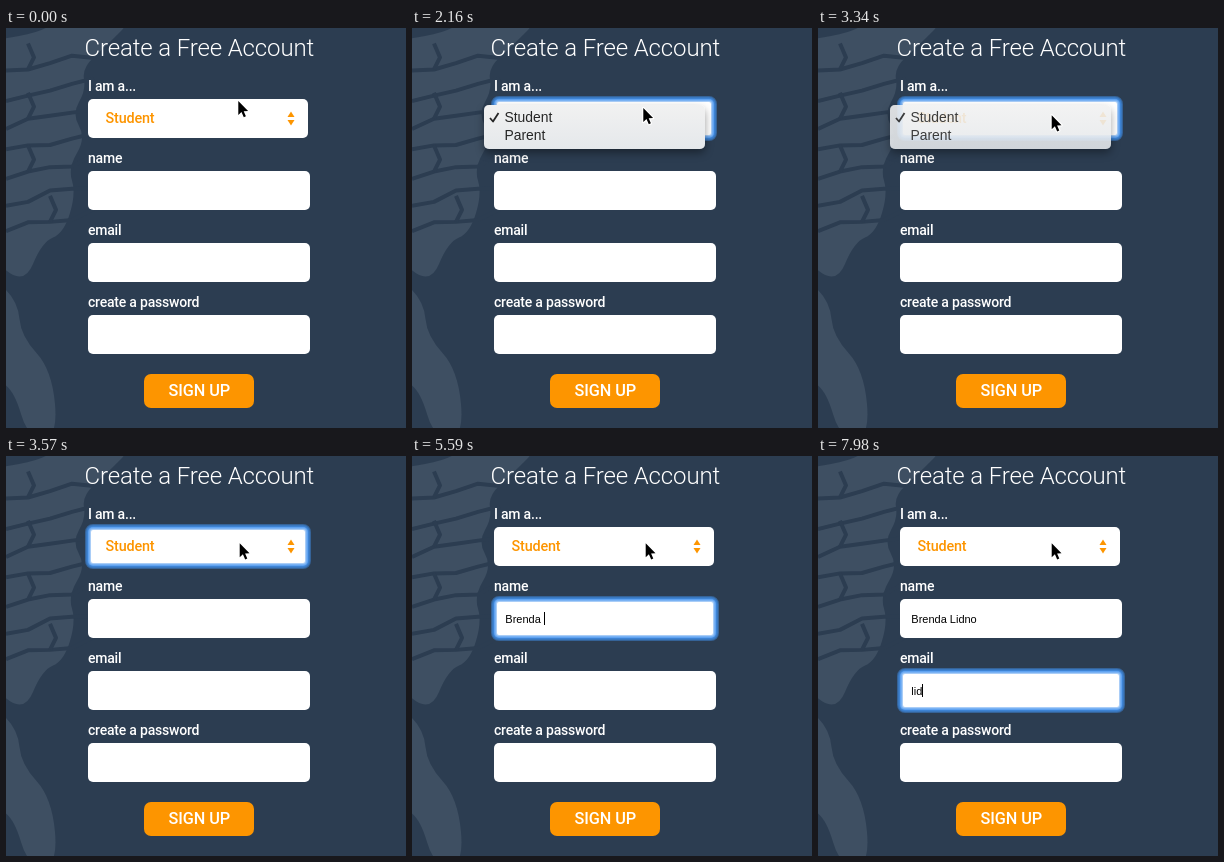
An HTML page with a canvas for the animation above (8000 ms loop, 400 by 400 pixels).

```html
<!DOCTYPE html>
<html lang="en">
<head>
<meta charset="utf-8">
<title>Sign-up form</title>
<style>
  html, body { margin: 0; width: 100%; height: 100%; overflow: hidden; background: #2c3d51; }
  canvas { display: block; width: 400px; height: 400px; }
</style>
</head>
<body>
<canvas id="stage"></canvas>
<script>
const LOOP = 8000;
const TICK = 115;
const NAVY = '#2c3d51', LAND = '#3e4f62', ORANGE = '#fd9500';
const BODY_FONT = 'Roboto, sans-serif';
const INPUT_FONT = '11px "Liberation Sans", Arial, sans-serif';
const MENU_FONT = '13.9px "Liberation Sans", Arial, sans-serif';

// Bursts of keystrokes, one key per tick
const NAME_KEYS = [['Bre', 4640], ['nda', 5120], [' ', 5590], ['Lid', 5950], ['no', 6660]];
const EMAIL_KEYS = [['li', 7380], ['d', 7980]];

const canvas = document.getElementById('stage');
const ctx = canvas.getContext('2d');
const ratio = window.devicePixelRatio || 1;
canvas.width = canvas.height = 400 * ratio;
ctx.scale(ratio, ratio);

const within = (t, from, to) => t >= from && t < to;

// Number of ticks begun since start, limited to count
function ticks(t, start, count) {
  return Math.max(0, Math.min(count, Math.floor((t - start) / TICK) + 1));
}

function typed(keys, t) {
  return keys.map(([str, start]) => str.slice(0, ticks(t, start, str.length))).join('');
}

function focusAt(t) {
  if (t >= 6900) return 'email';
  if (t >= 4040) return 'name';
  return t >= 2160 ? 'select' : '';
}

function menuAlpha(t) {
  return t < 2160 ? 0 : 1 - (ticks(t, 3340, 3) / 3) ** 2;
}

function seededRandom(seed) {
  return () => (seed = seed * 16807 % 2147483647) / 2147483647;
}

function trace(points, close = true) {
  ctx.beginPath();
  points.forEach(([x, y]) => ctx.lineTo(x, y));
  if (close) ctx.closePath();
}

function polygon(points, color) {
  trace(points);
  ctx.fillStyle = color;
  ctx.fill();
}

// Closed curve through the midpoints of the given corners
function blob(points, color) {
  ctx.beginPath();
  points.forEach(([x, y], i) => {
    const [nextX, nextY] = points[(i + 1) % points.length];
    ctx.quadraticCurveTo(x, y, (x + nextX) / 2, (y + nextY) / 2);
  });
  ctx.closePath();
  ctx.fillStyle = color;
  ctx.fill();
}

function roundBox(x, y, w, h, r) {
  ctx.beginPath();
  ctx.roundRect(x, y, w, h, r);
}

function text(str, x, y, font, color, align = 'left', spacing = 0) {
  ctx.font = font;
  ctx.letterSpacing = spacing + 'px';
  ctx.fillStyle = color;
  ctx.textAlign = align;
  ctx.fillText(str, x, y);
}

function drawMap() {
  blob([
    [-20, 14], [46, 2], [50, -20], [130, -12], [100, 18], [76, 40], [80, 62],
    [66, 86], [80, 110], [62, 140], [70, 165], [58, 205], [36, 214],
    [18, 258], [-20, 225]
  ], LAND);
  blob([
    [-12, 250], [12, 274], [15, 308], [46, 342], [52, 410], [22, 410], [8, 362], [-12, 350]
  ], LAND);

  const random = seededRandom(11);
  ctx.strokeStyle = NAVY;
  ctx.lineWidth = 4;
  ctx.lineJoin = 'round';
  for (let row = 0; row < 7; row++) {
    const river = [];
    for (let x = 0; x <= 88; x += 22) {
      river.push([x, 47 + row * 26 - x * 0.23 + (random() - 0.5) * 9]);
    }
    trace(river, false);
    ctx.stroke();
    if (row % 2) continue;
    const [x, y] = river[1 + Math.floor(random() * 2)];
    trace([[x, y], [x + 6, y - 12], [x, y - 26]], false);
    ctx.stroke();
  }
}

function drawField(y, focused, w = 222) {
  roundBox(82, y, w, 39, 5);
  ctx.fillStyle = '#fff';
  ctx.fill();
  if (!focused) return;
  ctx.strokeStyle = 'rgba(66,145,238,.45)';
  for (let width = 6; width > 0; width -= 2) {
    ctx.lineWidth = width;
    ctx.stroke();
  }
}

function drawEntry(str, fieldY, caret) {
  const x = 93.3;
  text(str, x, fieldY + 24, INPUT_FONT, '#000');
  if (caret) ctx.fillRect(Math.round(x + ctx.measureText(str).width), fieldY + 13, 1, 13);
}

function drawSelect(focused) {
  drawField(71, focused, 220);
  text('Student', 99.6, 95, `500 14.4px ${BODY_FONT}`, ORANGE, 'left', -0.2);
  for (const side of [-1, 1]) {
    const base = 90.5 + side * 1.5;
    polygon([[281.5, base], [285, base + side * 5.5], [288.5, base]], ORANGE);
  }
}

function drawMenuShadow() {
  ctx.save();
  ctx.beginPath();
  ctx.rect(0, 0, 400, 400);
  ctx.roundRect(72, 77, 221, 44, 5);
  ctx.clip('evenodd');
  ctx.shadowColor = 'rgba(0,0,0,.4)';
  ctx.shadowBlur = 9 * ratio;
  ctx.shadowOffsetY = 4 * ratio;
  roundBox(72, 77, 221, 44, 5);
  ctx.fill();
  ctx.restore();
}

function verticalGradient(top, bottom, from, to) {
  const gradient = ctx.createLinearGradient(0, top, 0, bottom);
  gradient.addColorStop(0, from);
  gradient.addColorStop(1, to);
  return gradient;
}

function drawMenu(alpha, highlighted) {
  ctx.save();
  ctx.globalAlpha = alpha;
  drawMenuShadow();
  roundBox(72, 77, 221, 44, 5);
  ctx.fillStyle = verticalGradient(77, 121, '#f1f1f1', '#e5e8eb');
  ctx.fill();

  if (highlighted) {
    ctx.fillStyle = verticalGradient(81, 99, '#5a92f5', '#2368ef');
    ctx.fillRect(72, 81, 221, 18);
  }
  const ink = '#262626';
  const firstInk = highlighted ? '#fff' : ink;
  text('Student', 92.5, 94, MENU_FONT, firstInk);
  text('Parent', 92.5, 112, MENU_FONT, ink);
  trace([[78, 90], [81, 93.5], [86.5, 85]], false);
  ctx.strokeStyle = firstInk;
  ctx.lineWidth = 1.8;
  ctx.stroke();
  ctx.restore();
}

function drawPointer(t) {
  const x = 232.3 - ticks(t, 120, 1) + ticks(t, 2750, 3) * 0.8;
  const y = 73 + ticks(t, 1560, 2) * 3.5 + ticks(t, 2750, 3) * 2.4;
  ctx.save();
  ctx.translate(x, y);
  trace([[0, 0], [0, 14], [3.2, 11], [5.5, 16.2], [7.6, 15.3], [5.4, 10.2], [9.8, 10]]);
  ctx.lineJoin = 'round';
  ctx.strokeStyle = '#fff';
  ctx.lineWidth = 2.4;
  ctx.stroke();
  ctx.fillStyle = '#000';
  ctx.fill();
  ctx.restore();
}

function draw(t) {
  const focus = focusAt(t);
  const menu = menuAlpha(t);
  const caret = !within(t, 4520, 4640);
  ctx.fillStyle = NAVY;
  ctx.fillRect(0, 0, 400, 400);
  drawMap();

  text('Create a Free Account', 193.3, 28, `300 24px ${BODY_FONT}`, '#fff', 'center', -0.14);
  ['I am a...', 'name', 'email', 'create a password'].forEach((label, i) =>
    text(label, 82, 63 + 72 * i, `500 14px ${BODY_FONT}`, '#fff', 'left', -0.22));

  drawSelect(focus === 'select');
  drawField(143, focus === 'name');
  drawField(215, focus === 'email');
  drawField(287, false);
  drawEntry(typed(NAME_KEYS, t), 143, focus === 'name' && caret);
  drawEntry(typed(EMAIL_KEYS, t), 215, focus === 'email' && caret);

  roundBox(138, 346, 110, 34, 7);
  ctx.fillStyle = ORANGE;
  ctx.fill();
  text('SIGN UP', 193.3, 368, `500 16.3px ${BODY_FONT}`, '#fff', 'center', -0.1);

  if (menu) drawMenu(menu, within(t, 2750, 3220));
  drawPointer(t);
}

function tick() {
  draw(performance.now() % LOOP);
  requestAnimationFrame(tick);
}
tick();
</script>
</body>
</html>
```
